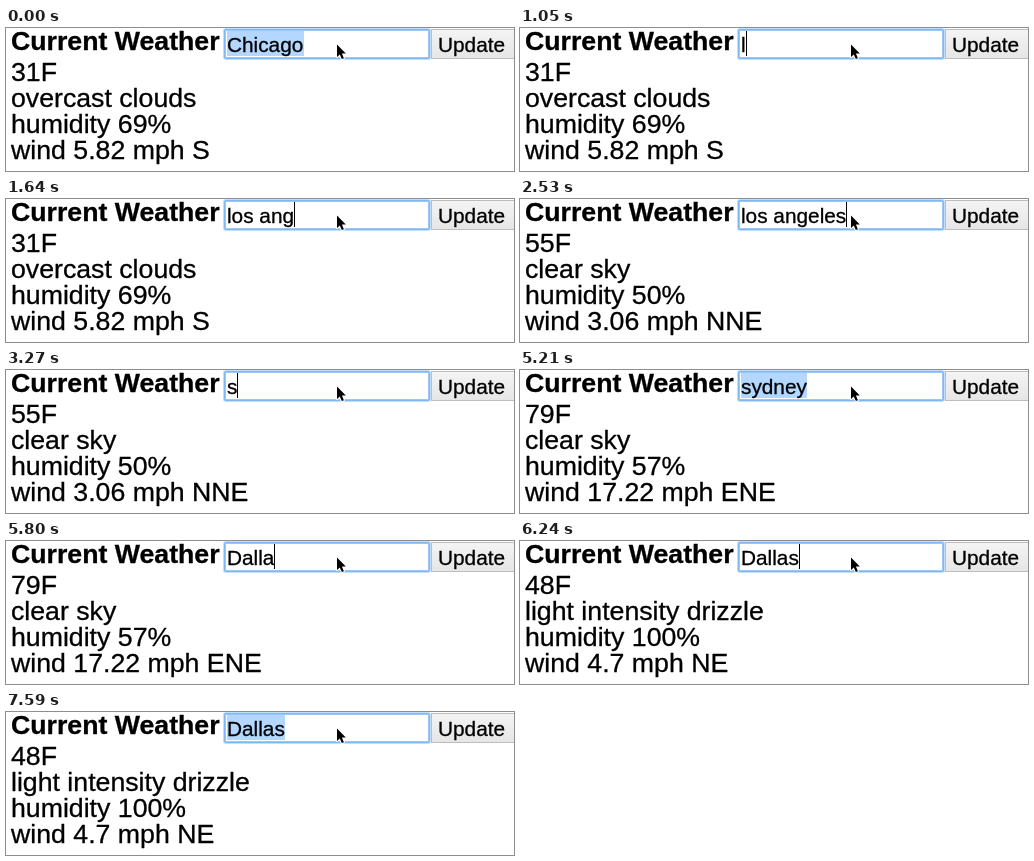
Write an HTML page with a canvas that moves like this. It is 508 px wide and 143 px high and loops after 8000 ms.

```html
<!DOCTYPE html>
<html lang="en">
<head>
<meta charset="utf-8">
<title>Current Weather</title>
<style>
  html, body { margin: 0; width: 100%; height: 100%; overflow: hidden; background: #fff; }
  canvas { display: block; }
</style>
</head>
<body>
<canvas id="stage" width="508" height="143"></canvas>
<script>
const ctx = document.getElementById('stage').getContext('2d');
const LOOP = 8000;
const FAMILY = '"Liberation Sans", Arial, Helvetica, sans-serif';
const BODY = '26.7px ' + FAMILY;
const FIELD = '20.8px ' + FAMILY;

const reports = [
  [0, ['31F', 'overcast clouds', 'humidity 69%', 'wind 5.82 mph S']],
  [2530, ['55F', 'clear sky', 'humidity 50%', 'wind 3.06 mph NNE']],
  [4160, ['79F', 'clear sky', 'humidity 57%', 'wind 17.22 mph ENE']],
  [6240, ['48F', 'light intensity drizzle', 'humidity 100%', 'wind 4.7 mph NE']]
];

// Field states: start time, text, mode
const field = [[0, 'Chicago', 'selected']];

function type(start, word, lengths) {
  lengths.forEach((n, i) => {
    const at = Math.round((start + i * 147.5) / 10) * 10;
    field.push([at, word.slice(0, n), 'caret']);
  });
}

type(1050, 'los angeles', [1, 3, 5, 6, 7, 8, 10, 11]);
field.push([3120, 'los angeles', 'selected']);
type(3270, 'sydney', [1, 2, 3, 5, 6]);
field.push([4760, 'sydney', 'plain'], [5210, 'sydney', 'selected']);
type(5500, 'Dallas', [1, 3, 5, 6]);
field.push([6840, 'Dallas', 'plain'], [7290, 'Dallas', 'caret'], [7590, 'Dallas', 'selected']);

function current(list, t) {
  let found = list[0];
  for (const item of list) if (item[0] <= t) found = item;
  return found;
}

// A hairline stroke gives the slightly heavier smoothed letters
function text(str, x, y, font) {
  ctx.font = font;
  ctx.fillStyle = ctx.strokeStyle = '#000';
  ctx.lineWidth = 0.3;
  ctx.lineJoin = 'round';
  ctx.fillText(str, x, y);
  ctx.strokeText(str, x, y);
}

function rect(x, y, w, h, color) {
  ctx.fillStyle = color;
  ctx.fillRect(x, y, w, h);
}

function ring(inset, radius, color) {
  ctx.fillStyle = color;
  ctx.beginPath();
  ctx.roundRect(217 + inset, inset, 208 - 2 * inset, 32 - 2 * inset, radius);
  ctx.fill();
}

function drawField([, value, mode]) {
  ring(0, 3, '#c3defb');
  ring(1, 2, '#7fb8f6');
  ring(2, 1, '#9cc6f5');
  rect(220, 3, 202, 26, '#fff');

  ctx.font = FIELD;
  const width = ctx.measureText(value).width;
  if (mode === 'selected') rect(221, 3, Math.ceil(width), 25, '#b3d7ff');
  text(value, 221, 24, FIELD);
  if (mode === 'caret') rect(Math.round(221 + width), 3, 1, 25, '#000');
}

function drawButton() {
  const shade = ctx.createLinearGradient(0, 2, 0, 30);
  shade.addColorStop(0, '#f4f4f4');
  shade.addColorStop(1, '#e6e6e6');
  rect(425, 1, 83, 30, '#bdbdbd');
  rect(426, 2, 82, 28, shade);
  text('Update', 432, 24, FIELD);
}

function drawPointer() {
  const outline = [[0, 0], [0, 12.5], [2.8, 9.9], [4.8, 14.6], [6.9, 13.7], [4.9, 9.1], [8.8, 9.1]];
  ctx.beginPath();
  outline.forEach(([x, y]) => ctx.lineTo(331 + x, 16.5 + y));
  ctx.closePath();
  ctx.lineJoin = 'round';
  ctx.lineWidth = 2;
  ctx.strokeStyle = '#fff';
  ctx.stroke();
  ctx.fillStyle = '#000';
  ctx.fill();
}

function draw(t) {
  rect(0, 0, 508, 143, '#fff');
  text('Current Weather', 5, 22, 'bold ' + BODY);
  current(reports, t)[1].forEach((line, i) => text(line, 5, 53 + 26 * i, BODY));
  drawButton();
  drawField(current(field, t));
  drawPointer();
}

const begin = performance.now();

function tick() {
  draw((performance.now() - begin) % LOOP);
  requestAnimationFrame(tick);
}

tick();
</script>
</body>
</html>
```
